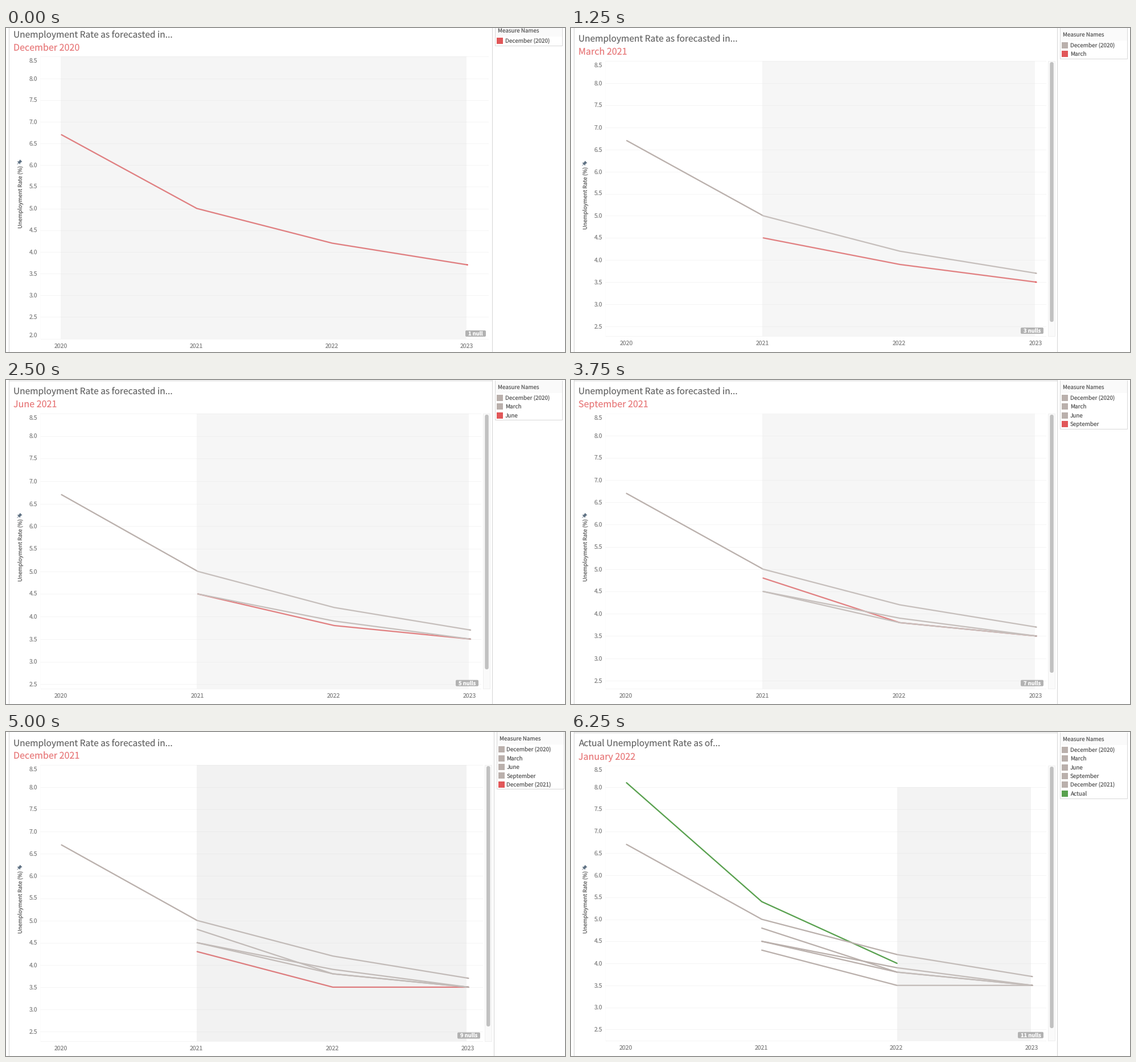
These frames come from a looping animation (982 px wide and 570 px high, 7.5 s). A matplotlib script:

```python
import matplotlib.pyplot as plt
from matplotlib.animation import FuncAnimation
from matplotlib.patches import FancyBboxPatch, Polygon, Rectangle

W, H, DPI = 982, 570, 100
RED, GREY, GREEN = "#e15759", "#bab0ac", "#59a14f"
TITLE, DATE, TICK, INK = "#686868", "#e87b7c", "#868686", "#595959"
VEIL = 0.3

plt.rcParams["font.family"] = ["Noto Sans CJK JP", "DejaVu Sans"]
plt.rcParams["text.hinting"] = "none"

# name, first year, values
SERIES = [
    ("December (2020)", 0, [6.7, 5.0, 4.2, 3.7]),
    ("March", 1, [4.5, 3.9, 3.5]),
    ("June", 1, [4.5, 3.8, 3.5]),
    ("September", 1, [4.8, 3.8, 3.5]),
    ("December (2021)", 1, [4.3, 3.5, 3.5]),
    ("Actual", 0, [8.1, 5.4, 4.0]),
]
FORECAST = "Unemployment Rate as forecasted in..."
ACTUAL = "Actual Unemployment Rate as of..."

# dy: header offset, y8: height of 8.0, unit: pixels per percent point,
# xs: first and last year, band: shaded box, thumb: scroll handle
SCENES = [
    dict(date="December 2020", dy=-7.5, y8=88.6, unit=76.3, xs=(97.5, 810.8),
         plot=(50, 546.5), band=(96, 50, 809), shade=245, nulls="1 null",
         badge=(807, 532, 36), thumb=None),
    dict(date="March 2021", dy=0, y8=97, unit=77.8, xs=(98, 817.5),
         plot=(57.5, 542), band=(336, 57.5, 815), shade=247, nulls="3 nulls",
         badge=(790, 527, 40), thumb=(60, 517)),
    dict(date="June 2021", dy=1, y8=98.5, unit=79.4, xs=(97.5, 816),
         plot=(58.5, 543), band=(335.5, 58.5, 813.5), shade=247, nulls="5 nulls",
         badge=(790, 527.7, 40), thumb=(61, 509)),
    dict(date="September 2021", dy=1, y8=97.6, unit=78.4, xs=(97.5, 817.5),
         plot=(58.5, 543), band=(336, 58.5, 815), shade=247, nulls="7 nulls",
         badge=(790, 527.7, 40), thumb=(61, 515)),
    dict(date="December 2021", dy=0.3, y8=97, unit=78.2, xs=(97.5, 812.5),
         plot=(57.5, 543.5), band=(335, 57.5, 809.5), shade=243, nulls="9 nulls",
         badge=(793, 528.5, 40), thumb=(60, 518), dx=2.7),
    dict(date="January 2022", dy=1, y8=97, unit=77.5, xs=(97.5, 810.5),
         plot=(58.5, 543), band=(573, 97, 808.5), shade=244, nulls="11 nulls",
         badge=(785, 527.7, 45), thumb=(61, 521), title=ACTUAL),
]

fig = plt.figure(figsize=(W / DPI, H / DPI), dpi=DPI, facecolor="white")
ax = fig.add_axes([0, 0, 1, 1])


def px(size):
    return size * 72 / DPI


def text(x, y, s, size, color, **kw):
    ax.text(x, y, s, fontsize=px(size), color=color, **kw)


def box(x0, y0, x1, y1, color, edge="none", z=1, **kw):
    ax.add_patch(Rectangle((x0, y0), x1 - x0, y1 - y0, facecolor=color,
                           edgecolor=edge, linewidth=px(1), zorder=z, **kw))


def pill(x0, y0, x1, y1, r, color):
    ax.add_patch(FancyBboxPatch((x0, y0), x1 - x0, y1 - y0, linewidth=0,
                                boxstyle=f"round,pad=0,rounding_size={r}",
                                facecolor=color, zorder=6))


def line(xs, ys, color, width=1, z=1, **kw):
    ax.plot(xs, ys, color=color, linewidth=px(width), zorder=z, **kw)


def pin(x, y):
    pts = [(1, -5), (5, -1), (3.5, -0.5), (1.5, 1.5), (1.5, 3.8), (-0.8, 1.6),
           (-4.5, 4.5), (-1.8, 0.7), (-4, -1.5), (-1.5, -1.5), (0.5, -3.5)]
    ax.add_patch(Polygon([(x + a, y + b) for a, b in pts],
                         facecolor="#5f7183", linewidth=0))


def header(sc):
    dx, dy = sc.get("dx", 0), sc["dy"]
    text(13, 24.6 + dy, sc.get("title", FORECAST), 15.5, TITLE)
    text(13, 46.8 + dy, sc["date"], 16.1, DATE)
    line([5.5, 5.5], [0, H], "#d4d4d4")
    line([854.5 + dx] * 2, [0, H], "#d4d4d4")
    if dy == 1:
        line([5.5, 854.5], [0.5, 0.5], "#d4d4d4")


def legend(sc, n):
    dx, dy = sc.get("dx", 0), sc["dy"]
    top = -0.5 + dy
    bottom = 38.5 + 15.4 * n + dy
    box(859.5 + dx, top, 977.5 + dx, bottom, "white", "#d8d8d8")
    box(860 + dx, top + 0.5, 977 + dx, 22 + dy, "#fafafa", z=2)
    text(864.5 + dx, 15 + dy, "Measure Names", 9.8, INK)
    for i in range(n + 1):
        y = 30.3 + dy + 15.4 * i
        color = GREY if i < n else GREEN if n == 5 else RED
        box(862.5 + dx, y - 5.5, 873.3 + dx, y + 5.5, color, z=3)
        text(876.8 + dx, y + 3.6, SERIES[i][0], 9.9, INK)


def axes(sc, right):
    top, bottom = sc["plot"]
    x0, x1 = sc["xs"]
    line([60, right], [top, top], "#fbfbfb")
    line([60, right], [bottom, bottom], "#f4f4f4")
    line([60.5, 60.5], [top, bottom], "#fbfbfb")
    for i in range(14):
        val = 8.5 - i / 2
        y = sc["y8"] + (8 - val) * sc["unit"]
        if y > bottom + 2:
            break
        if top < y < bottom - 2:
            line([60, right], [y, y], "#f5f5f5")
        y = min(max(y, top + 7.5), bottom - 6.5)
        text(55.5, y + 3.8, f"{val:.1f}", 10.5, TICK, ha="right")
    for i in range(4):
        x = x0 - 0.8 + (x1 - x0 - 0.4) * i / 3
        text(x, bottom + 15.9, str(2020 + i), 10.5, TICK, ha="center")
    dy = 0.3 * sc["dy"]
    text(31, 298.8 + dy, "Unemployment Rate (%)", 9.6, INK,
         rotation=90, ha="right", va="center")
    pin(23.5, 238.5 + dy)


def curves(sc, n):
    x0, x1 = sc["xs"]
    for i in range(n, -1, -1):
        _, start, vals = SERIES[i]
        xs = [x0 + (x1 - x0) * (start + k) / 3 for k in range(len(vals))]
        ys = [sc["y8"] + (8 - v) * sc["unit"] for v in vals]
        color = GREY if i < n else GREEN if n == 5 else RED
        line(xs, ys, color, 2.3, 3, solid_capstyle="round")
    left, top, right = sc["band"]
    tone = (255 - (255 - sc["shade"]) / VEIL) / 255
    box(left, top, right, sc["plot"][1], (tone,) * 3, z=5, alpha=VEIL)


def extras(sc):
    x, y, w = sc["badge"]
    pill(x, y, x + w, y + 11, 2, "#b2b2b2")
    text(x + w / 2, y + 8.8, sc["nulls"], 9.4, "white", ha="center",
         weight="bold", zorder=7)
    if sc["thumb"]:
        dx = sc.get("dx", 0)
        top, bottom = sc["plot"]
        box(838.5 + dx, top, 850.5 + dx, bottom, "#fafafa", "#efefef")
        a, b = sc["thumb"]
        pill(841.3 + dx, a, 847.8 + dx, b, 3.2, "#c1c1c1")


def draw(n):
    sc = SCENES[n]
    ax.clear()
    ax.set_xlim(0, W)
    ax.set_ylim(H, 0)
    ax.axis("off")
    header(sc)
    legend(sc, n)
    axes(sc, 847 if n == 0 else 834 + sc.get("dx", 0))
    curves(sc, n)
    extras(sc)
    if n == 1:
        line([12, 850], [569.5, 569.5], "#d8d8d8")
    return []


anim = FuncAnimation(fig, draw, frames=len(SCENES), init_func=lambda: [],
                     interval=1250, repeat=True, repeat_delay=0)
plt.show()
```
